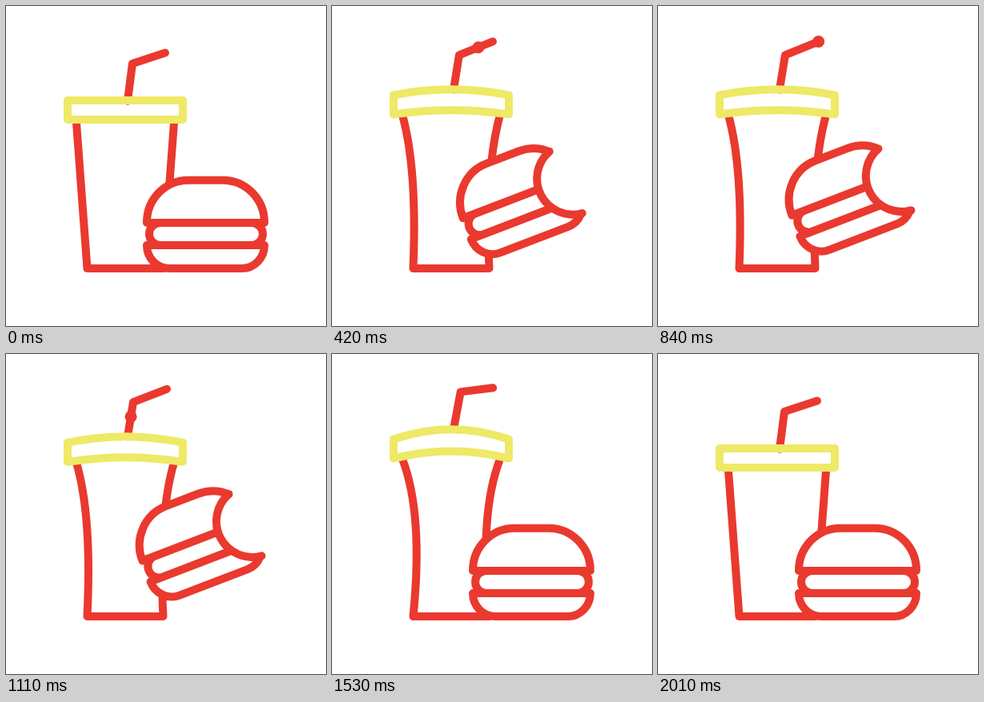
An HTML page for the animation above (2.04 s loop, 400 by 400 pixels).

```html
<!DOCTYPE html>
<html lang="en">
<head>
<meta charset="utf-8">
<title>Fast food</title>
<style>
  html, body { margin: 0; width: 100%; height: 100%; overflow: hidden; background: #fff; }
  svg { display: block; width: 100%; height: 100%; }
</style>
</head>
<body>
<svg viewBox="0 0 400 400" fill="none" stroke="#ea392f" stroke-width="10" stroke-linecap="round" stroke-linejoin="round">
  <path id="cup"/>
  <path id="straw"/>
  <circle id="gulp" r="7.5" fill="#ea392f" stroke="none"/>
  <path id="lid" stroke="#eee966"/>
  <g id="burger" fill="#fff">
    <rect x="179" y="271" width="142" height="28" rx="14"/>
    <path d="M176 271A52 53 0 0 1 228 217.7H271A52 53 0 0 1 323 271Z"/>
    <path d="M176 299H323A28 29 0 0 1 295 328H204A28 29 0 0 1 176 299Z"/>
    <g id="bite">
      <circle cx="321.6" cy="274.2" r="44.7" stroke="none"/>
      <path fill="none" d="M306.7 232A44.7 44.7 0 0 0 317.4 318.6"/>
    </g>
  </g>
</svg>
<script>
const LOOP = 2040, STEP = 30;
const GULP_START = 101, GULP_TIME = 192.6, GULPS = 7, GULP_TRAVEL = 106;
const BITE_START = 330, BITE_END = 1200, LANDING = 1270;

const [cup, straw, gulp, lid, burger, bite] =
  ['cup', 'straw', 'gulp', 'lid', 'burger', 'bite'].map(id => document.getElementById(id));

// Eased step from 0 to 1 between two times.
function ramp(t, from, to) {
  const u = Math.min(1, Math.max(0, (t - from) / (to - from)));
  return u * u * (3 - 2 * u);
}

function show(element, visible) {
  element.style.display = visible ? '' : 'none';
}

const gulpPhase = t => Math.min(GULPS, Math.max(0, (t - GULP_START) / GULP_TIME));

// 0 at rest, 1 while drinking, 2 for the final stretch.
function stretch(t) {
  const pulse = .045 * Math.sin(2 * Math.PI * gulpPhase(t));
  return .98 * ramp(t, 0, 180) + 1.02 * ramp(t, 1440, 1590) - 2 * ramp(t, 1740, 1990) + pulse;
}

function drawDrink(k) {
  const top = 118 - 7 * k, bottom = 142 - 7 * k;
  lid.setAttribute('d',
    `M77 ${top}Q149 ${top - 15 * k} 221 ${top}V${bottom}Q149 ${bottom - 11 * k} 77 ${bottom}Z`);

  const bend = k * (k - 1);
  const waist = bottom + .35 * (328 - bottom), pinch = 15 * k - 2.5 * bend;
  cup.setAttribute('d', `M87.7 ${bottom}Q${92.5 + pinch} ${waist} 101.5 328` +
    `H196.5Q${205.5 - pinch} ${waist} 210.3 ${bottom}`);

  const elbow = [158 + k + bend, 72 - 11.5 * k - 5.5 * bend];
  const tip = [199 + 2 * k - bend, 58.5 - 14.5 * k + 7.25 * bend];
  straw.setAttribute('d', `M152 ${118.7 - 15 * k}L${elbow}L${tip}`);
}

function drawGulp(t) {
  const s = gulpPhase(t) % 1 * GULP_TRAVEL, length = straw.getTotalLength();
  const p = straw.getPointAtLength(Math.min(s, length));
  gulp.setAttribute('cx', p.x);
  gulp.setAttribute('cy', p.y);
  show(gulp, s > 8 && s < length + 3);
}

function drawBurger(t) {
  const drop = 1 - ramp(t, 1110, 1290);
  const lift = ramp(t, 0, 286) * drop;
  const recoil = 8 * (ramp(t, 330, 450) - ramp(t, 600, 1020));
  const x = -10.4 * ramp(t, 0, 210) * drop - recoil;
  const y = -39 * lift + recoil;
  const since = Math.max(0, t - LANDING);
  const squash = .14 * Math.exp(-since / 60) * Math.sin(since / 45);
  burger.setAttribute('transform', `translate(${x} ${y}) rotate(${-21 * lift} 250 271) ` +
    `translate(250 333) scale(${1 + squash} ${1 - squash * .7}) translate(-250 -333)`);
  show(bite, t >= BITE_START && t < BITE_END);
}

function draw(t) {
  drawDrink(stretch(t));
  drawGulp(t);
  drawBurger(t);
}

const start = performance.now();
function tick() {
  const t = (performance.now() - start) % LOOP;
  draw(Math.floor(t / STEP) * STEP);
  requestAnimationFrame(tick);
}
draw(0);
requestAnimationFrame(tick);
</script>
</body>
</html>
```
